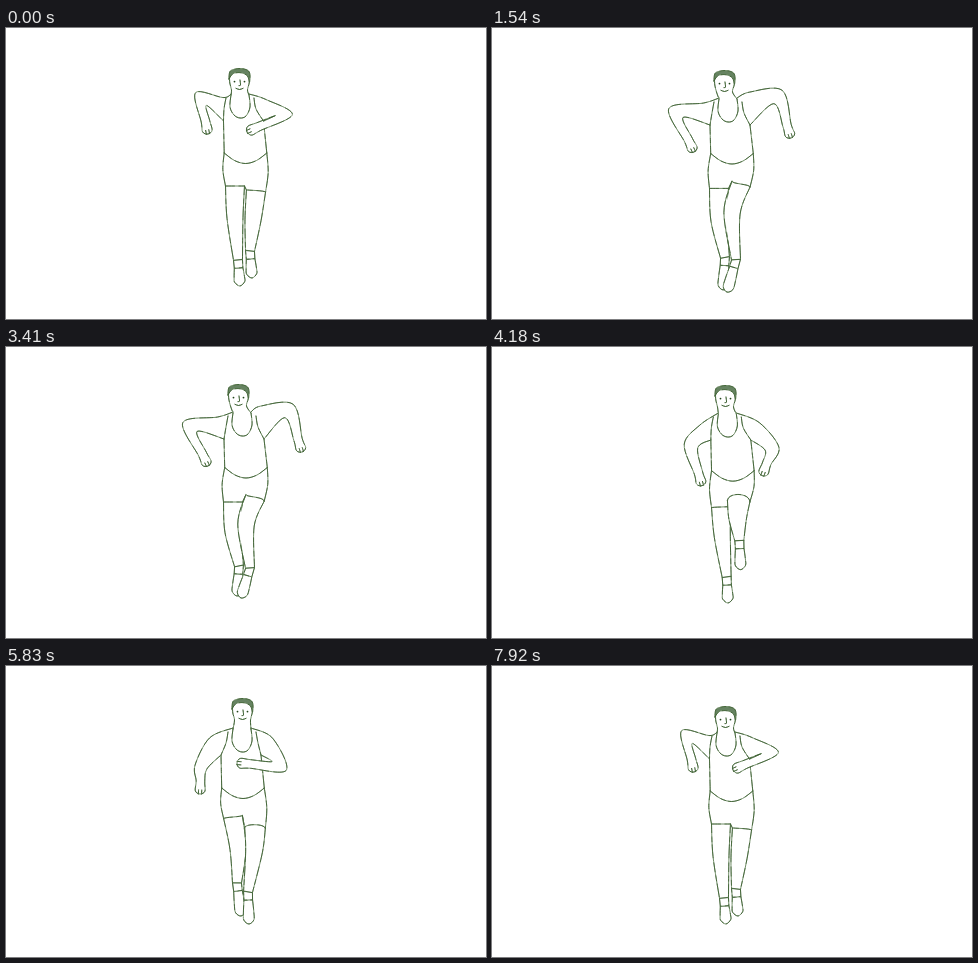
An HTML page with a canvas for the animation above (8000 ms loop, 480 by 291 pixels).

```html
<!DOCTYPE html>
<html lang="en">
<head>
<meta charset="utf-8">
<title>Dancing runner</title>
<style>
html, body { margin: 0; width: 100%; height: 100%; overflow: hidden; background: #fff; }
canvas { display: block; width: 100vw; height: 100vh; }
</style>
</head>
<body>
<canvas id="stage"></canvas>
<script>
const W = 480, H = 291, LOOP = 8000, STEP = 110, COUNT = 18;
const canvas = document.getElementById('stage');
const ctx = canvas.getContext('2d');
const ratio = window.devicePixelRatio || 1;
canvas.width = W * ratio;
canvas.height = H * ratio;

// Joints of a pose. Arms: shoulder, elbow, fingertips. Legs: cuff, knee, ankle, toe.
// L and R are screen sides.
const lean = {
  head: [[233.5, 40]], neck: [[234, 67]], waist: [[239.5, 125]],
  armL: [[214, 78], [195, 71], [202, 106]],
  armR: [[257, 80], [278, 87], [241, 104]],
  legL: [[229, 158], [229, 190], [232, 232], [234, 258]],
  legR: [[250, 163], [247, 192], [244, 223], [246, 250]]
};
const kneeUp = {
  head: [[233.5, 37]], neck: [[236, 67]], waist: [[241.5, 123]],
  armL: [[214, 88], [201, 113], [214, 155]],
  armR: [[263, 83], [281, 109], [285, 141]],
  legL: [[229, 161], [231, 190], [236, 229], [237, 255]],
  legR: [[245, 150], [245, 162], [249, 179], [250, 209]]
};
const hop = {
  head: [[238.5, 26]], neck: [[238, 60]], waist: [[237, 118]],
  armL: [[213, 82], [203, 107], [208, 138]],
  armR: [[259, 82], [264, 108], [227, 114]],
  legL: [[229, 144], [232, 165], [226.5, 205], [225, 231]],
  legR: [[248, 156], [245, 188], [244, 222], [249, 250]]
};
const air = {
  head: [[232.5, 37]], neck: [[236, 66]], waist: [[240, 120.5]],
  armL: [[212, 79], [184, 80], [202, 119]],
  armR: [[256, 68], [283, 64], [296, 105]],
  legL: [[227, 155], [227, 185], [233, 219], [231, 249]],
  legR: [[249, 151], [240, 178], [244, 221], [235, 251]]
};
const stride = {
  head: [[236.5, 32]], neck: [[236, 63]], waist: [[237, 122]],
  armL: [[211, 77], [195, 101], [194, 128]],
  armR: [[259, 77], [273, 100], [231, 97]],
  legL: [[227, 151], [232, 183], [231, 217], [235, 250]],
  legR: [[249, 162], [248, 186], [242, 226], [243, 258]]
};

const mapPose = (pose, fn) =>
  Object.fromEntries(Object.entries(pose).map(([k, pts]) => [k, pts.map((p, i) => fn(p, i, k))]));
const lerp = (a, b, t) => [a[0] + (b[0] - a[0]) * t, a[1] + (b[1] - a[1]) * t];
const mix = (a, b, t) => mapPose(a, (p, i, k) => lerp(p, b[k][i], t));

const swing = { ...kneeUp,
  armL: [[214, 86], [187, 104], [202, 141]],
  armR: [[263, 82], [290, 102], [290, 131]]
};
const plant = mapPose({ ...mix(swing, hop, 0.5), legL: kneeUp.legL, legR: hop.legR },
  ([x, y]) => [x, y + 3]);
const land = mapPose(air, ([x, y], i, k) =>
  [x + (k === 'armR' ? 3 : 0), y + 5 + Math.max(0, y - 150) * 0.08]);
const reach = { ...mix(land, stride, 0.33), armR: [[257, 70], [292, 76], [308, 113]] };

const keys = [[0, lean], [3, kneeUp], [4, swing], [6, plant], [8, hop],
  [12, mix(hop, air, 0.93)], [13, air], [14, land], [15, reach], [17, stride], [COUNT, lean]];

function poseAt(n) {
  const j = keys.findIndex(([at]) => at > n);
  const [a, from] = keys[j - 1], [b, to] = keys[j];
  return mix(from, to, (n - a) / (b - a));
}
const poses = Array.from({ length: COUNT }, (_, n) => poseAt(n));

const dist = (a, b) => Math.hypot(b[0] - a[0], b[1] - a[1]);
const unit = (a, b) => { const d = dist(a, b) || 1; return [(b[0] - a[0]) / d, (b[1] - a[1]) / d]; };
const shift = (p, v, d) => [p[0] + v[0] * d, p[1] + v[1] * d];
const around = ([x, y], pts) => pts.map(([dx, dy]) => [x + dx, y + dy]);

// Both edges of a bent, tapering limb; side 1 is L, -1 is R
function edges(joints, widths, side) {
  const out = [], inner = [];
  joints.forEach((p, i) => {
    const next = joints[i + 1], prev = joints[i - 1];
    const d1 = prev ? unit(prev, p) : unit(p, next);
    const d2 = next ? unit(p, next) : d1;
    const n = unit([0, 0], [-d1[1] - d2[1], d1[0] + d2[0]]);
    const miter = Math.min(1.4, 1 / Math.max(0.1, n[1] * d1[0] - n[0] * d1[1]));
    out.push(shift(p, n, widths[i] * miter * side));
    inner.push(shift(p, n, -widths[i] * miter * side));
  });
  return { out, inner };
}

// Smooth curve through all points
function curve(pts) {
  const path = new Path2D();
  const at = i => pts[Math.max(0, Math.min(pts.length - 1, i))];
  path.moveTo(...pts[0]);
  for (let i = 0; i < pts.length - 1; i++) {
    const [a, b, c, d] = [at(i - 1), at(i), at(i + 1), at(i + 2)];
    path.bezierCurveTo(b[0] + (c[0] - a[0]) / 6, b[1] + (c[1] - a[1]) / 6,
      c[0] - (d[0] - b[0]) / 6, c[1] - (d[1] - b[1]) / 6, c[0], c[1]);
  }
  return path;
}

// Pencil line: a thin base with darker broken strokes
function pencil(path) {
  ctx.lineWidth = 1;
  ctx.strokeStyle = '#6f8c65';
  ctx.stroke(path);
  ctx.strokeStyle = 'rgba(45, 82, 34, 0.65)';
  ctx.setLineDash([9, 4, 5, 3, 13, 5]);
  ctx.stroke(path);
  ctx.setLineDash([]);
}
const line = pts => pencil(curve(pts));

function shape(path, fill = '#fff') {
  ctx.fillStyle = fill;
  ctx.fill(path);
  pencil(path);
}

function arm([shoulder, elbow, tip], neck, armpit, side) {
  const dir = unit(elbow, tip);
  const joints = [shoulder, elbow, shift(tip, dir, -13), shift(tip, dir, -3)];
  const { out, inner } = edges(joints, [9, 6, 4.3, 4.8], side);
  shape(curve([[neck[0] - 9 * side, neck[1] - 1], ...out, tip, ...inner.slice(1).reverse(), armpit]));
  for (const d of [-1.6, 1.6]) {
    const knuckle = shift(tip, [-dir[1], dir[0]], d);
    line([shift(knuckle, dir, -4), knuckle]);
  }
}

// A short thigh points at the viewer: wider, with a raised cuff
function thigh([cuff, knee, ankle], side) {
  const near = Math.max(0, 30 - dist(cuff, knee));
  const { out, inner } = edges([cuff, knee, ankle], [9.5 + near * 0.14, 8 + near * 0.06, 4.5], side);
  const top = [cuff[0], (out[0][1] + inner[0][1]) / 2 - near * 0.75];
  return { out, inner, top };
}

function leg(joints, { out, inner, top }, waistEnd, side) {
  const [, , ankle, toe] = joints, dir = unit(ankle, toe);
  const cuff = new Path2D(), body = new Path2D();
  cuff.moveTo(...out[0]);
  cuff.bezierCurveTo(out[0][0], top[1], inner[0][0], top[1], ...inner[0]);
  body.addPath(cuff);
  [...inner, ...out.slice().reverse()].forEach(p => body.lineTo(...p));
  line([waistEnd, shift(lerp(waistEnd, out[0], 0.5), [-1, 0], 2 * side), out[0]]);
  ctx.fillStyle = '#fff';
  ctx.fill(body);
  [cuff, curve(out), curve(inner)].forEach(pencil);

  const heel = shift(ankle, dir, 8);
  const foot = edges([heel, lerp(heel, toe, 0.5), shift(toe, dir, -4)], [4.3, 5.2, 5], side);
  const shoe = curve([...foot.out, toe, ...foot.inner.reverse()]);
  const sock = new Path2D();
  [out[2], foot.out[0], foot.inner[2], inner[2]].forEach(p => sock.lineTo(...p));
  shoe.closePath();
  sock.closePath();
  shape(shoe);
  shape(sock);
}

function head(at, neck) {
  for (const s of [-1, 1])
    line([...around(at, [[10 * s, 9], [9.7 * s, 15], [8 * s, 22]]), [neck[0] + 9 * s, neck[1]]]);
  shape(curve(around(at, [[-10.5, 11], [-9.5, 3.5], [-4, 1], [3, 0.7], [9, 3], [10.5, 8],
    [10, 14], [8, 8], [2, 4.8], [-5, 5], [-8, 7], [-10.5, 11]])), '#668361');
  ctx.fillStyle = '#23451b';
  for (const s of [-1, 1]) {
    ctx.beginPath();
    ctx.arc(at[0] + 5 * s, at[1] + 13.6, 0.9, 0, 7);
    ctx.fill();
  }
  line(around(at, [[0.5, 12], [1, 17], [-0.5, 17.5]]));
  line(around(at, [[-3.5, 20.3], [0, 21.5], [3.5, 20.3]]));
}

function draw(pose) {
  const neck = pose.neck[0], waist = pose.waist[0];
  const ends = [-1, 1].map(s => [waist[0] + 21.3 * s, waist[1]]);
  const armpits = [-22, 18].map(dx => [waist[0] + dx, neck[1] + 26]);
  const thighL = thigh(pose.legL, 1), thighR = thigh(pose.legR, -1);

  ctx.setTransform(ratio, 0, 0, ratio, 0, 0);
  ctx.fillStyle = '#fff';
  ctx.fillRect(0, 0, W, H);
  ctx.lineCap = ctx.lineJoin = 'round';

  line([thighL.inner[0], thighR.inner[0]]);
  leg(pose.legL, thighL, ends[0], 1);
  leg(pose.legR, thighR, ends[1], -1);
  line(around(waist, [[-21.3, 0], [-11, 7.5], [0, 10.5], [11, 7.5], [21.3, 0]]));
  armpits.forEach((pit, i) => line([pit, lerp(pit, ends[i], 0.5), ends[i]]));
  arm(pose.armL, neck, armpits[0], 1);
  arm(pose.armR, neck, armpits[1], -1);
  armpits.forEach((pit, i) => {
    const s = i ? 1 : -1;
    line([...around(neck, [[14 * s, 3], [16 * s, 14]]), pit]);
  });
  line(around(neck, [[-9, 0], [-10, 12], [-6, 20], [0, 23], [6, 21], [10, 12], [9, 0]]));
  head(pose.head[0], neck);
}

const start = performance.now();
function tick() {
  const t = (performance.now() - start) % LOOP;
  draw(poses[Math.floor(t / STEP) % COUNT]);
  requestAnimationFrame(tick);
}
tick();
</script>
</body>
</html>
```
